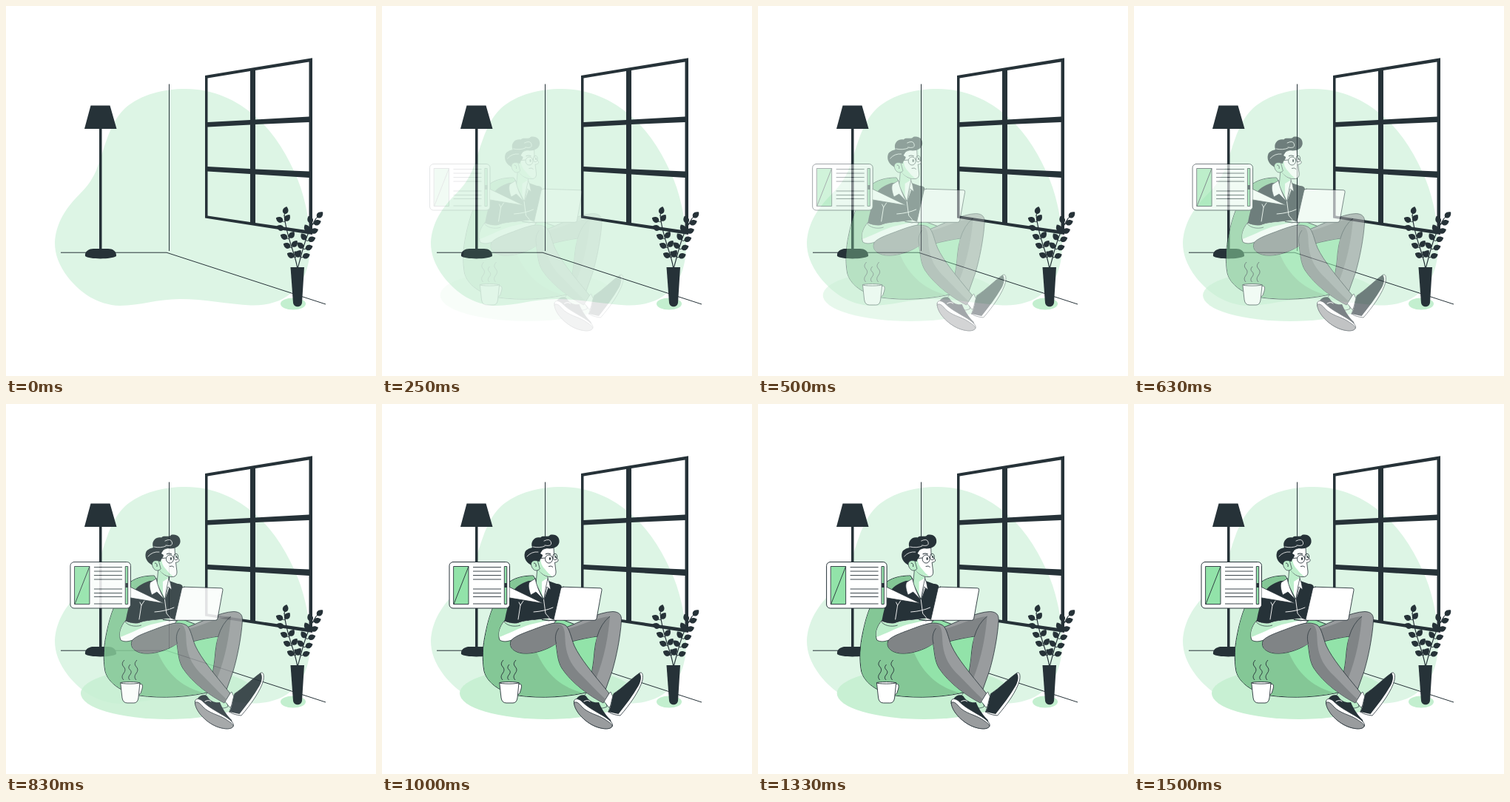
Animation of 500 by 500 pixels, one loop 1.54 s. Source, as an HTML page:

```html
<!DOCTYPE html>
<html lang="en">
<head>
<meta charset="utf-8">
<title>Reading nook</title>
<style>
html, body { margin: 0; width: 100%; height: 100%; overflow: hidden; background: #fff; }
svg { display: block; width: 100%; height: 100%; }
.k { fill: #263238; }
.g { fill: #92e3a9; }
.m { fill: #bdeecb; }
.w { fill: #fff; }
.p { fill: #999c9e; }
.s { fill: #808486; }
.l { fill: none; stroke: #263238; }
.o { stroke: #263238; stroke-linejoin: round; stroke-linecap: round; }
.h { fill: none; stroke: #fff; stroke-linecap: round; }
</style>
</head>
<body>
<svg viewBox="0 0 500 500">
  <!-- room -->
  <path fill="#ddf5e5" d="M243 112C280 112 312 127 338 150C364 173 382 205 394 234C406 264 411 297 411 323C411 352 402 376 384 389C372 399 354 405 331 404.500C301 403 268 396 235 396C204 396 181 405 154 405C123 404 100 387 84 367C71 350 66 335 66 320C67 296 79 276 94 260C107 247 115 238 122 222C133 195 138 160 161 138C183 119 213 112 243 112Z"/>
  <path class="l" d="M220.500 105.500V331M74 333.200H217L432 403"/>
  <path class="k" fill-rule="evenodd" d="M269 94L414 70.300V309L269 286.500Z
    M272.500 97.500L330 88V154L272.500 157Z M337 87L409.500 75.500V149.500L337 153.500Z
    M272.500 163.500L330 160.500V220L272.500 217Z M337 160L409.500 157V223.500L337 220.500Z
    M272.500 223.500L330 227V292L272.500 283.500Z M337 227.500L409.500 232V303.500L337 293Z"/>
  <path class="k" d="M114.500 134.500H140.500L149.500 166H106ZM126 165H129.500V330H126Z
    M107 338C106 331 113 328 118 328H138C144 328 149.500 331 149 338C143 342.500 112 342.500 107 338Z"/>
  <ellipse cx="388" cy="402.500" rx="17" ry="8" fill="#c3efcf"/>
  <path class="l" d="M393.500 353C391 335 378 310 376 282M394.500 353C400 335 404 310 419 287" stroke-width="1.200"/>
  <g id="leaves" class="k"></g>
  <path class="k" d="M384.500 353H403L400 401C399 408 389 408 388 401Z"/>

  <g id="scene" opacity="0">
    <ellipse cx="223" cy="391" rx="118" ry="35" fill="#c8f0d3"/>

    <!-- bean bag -->
    <path class="g o" d="M204 232C190 232 177 235 168 244C153 262 145 284 140 309C136 327 135 345 138 361C142 376 158 389 184 394C214 398 252 397 288 387C300 364 303 337 298 312L240 290Z"/>
    <path fill="#84c796" d="M204 232.500C190 232.500 178 235 169 244C153 263 145 284 140.500 309C136.500 327 136 345 138.500 361C142 376 158 388 184 393.500C212 397 242 396 272 390.500C246 384 222 368 208 333L215 280Z"/>

    <!-- far leg and shoe -->
    <path class="m o" d="M278 388L271 397C281 407 293 415 304 409L300 390Z" stroke-width=".7"/>
    <path class="p o" d="M246 303C267 295 293 281 312 280.500C321 281 324 285 323.500 293C322 315 317 341 311 361L300 392L276 390C283 370 286 350 287 335Q288 324 291 314Q276 316 256 321Z" stroke-width=".8"/>
    <path class="s" d="M250 304C270 299 291 288 308 287C306 312 301 342 289 372L282 375C286 355 287 335 290.500 313.500C279 316 268 317 256 320Z"/>
    <path class="l" d="M308 287Q296 296 290.500 315" stroke-width=".7"/>
    <path class="k" d="M263 398C266 393 273 392 276 395C280 402 287 404 293 403C296 410 300 418 309 427C312 436 307 437 301 433L268 411Z"/>
    <path class="w o" d="M259.500 402C260 397 265 398 269 401C278 410 285 413 293 418C302 423 313 430 311.500 435C310 439 302 440 292 437C275 432 259 414 259.500 402Z" stroke-width=".8"/>
    <path class="p o" d="M259.500 404C262 401 266 404 270 409C278 418 292 420 301 426C307 430 312 433 311 436C308 440 300 439.500 292 437C276 432 260 416 259.500 404Z" stroke-width=".8"/>
    <path class="h" d="M273 402Q278 399 281 402" stroke-width="1"/>

    <!-- torso -->
    <path class="k" d="M198 239C187 243 180 247 176 255C171 267 168 281 165.500 294L187 299L232 298L243 248C243 244 239 243 236 243L222 238Z"/>
    <path class="h" d="M191 266L187 272L184 291M187 272L185 268M218.500 264L221 283L227 290M205 281Q220 280 231 275" stroke-width=".9"/>
    <path class="m o" d="M210 221L208 243L218 263L224 247V231Z" stroke-width=".7"/>
    <path class="w" d="M224 235L216 240L216 256L219 264L225 247Z"/>
    <path class="w o" d="M207 236L199 241C197 246 199 252 201 258L208 254L218 264C213 255 209 246 207 236ZM224 236L226 241L228 251L223 247L219 264C220 253 222 245 224 236Z" stroke-width=".7"/>

    <!-- near leg and shoe -->
    <path class="w o" d="M298 399L309 389C311 394 313 398 317 399L307 410Z" stroke-width=".7"/>
    <path class="p o" d="M174 321C177 312 192 308 207 303C222 297 238 293 248 299C254 304 255 315 260 327C268 344 284 363 307 391L299 404C281 395 256 377 243 357C237 347 237 336 235 324C222 333 204 338 191 337C179 336 171 329 174 321Z" stroke-width=".8"/>
    <path class="s" d="M174.500 321C178 313 194 309 209 303.500C221 299 234 295.500 241 298C248 301 247 312 248 325C250 343 258 356 270 367C280 377 291 389 302 399L299 403.500C281 395 256 377 243.500 357C238 347 237 336 235.500 324C222 332 204 337.500 191 336.500C179 335 172 329 174.500 321Z"/>
    <path class="l" d="M235.500 324C233 315 235 308 239 303" stroke-width=".7"/>
    <path class="w o" d="M306 416C309 409 310 400 313 391.500C325 384 337 371 348 363.500C352 361.500 353 366 352 373C348 388 335 406 322 421C316 420.500 310 419 306 416Z" stroke-width=".8"/>
    <path class="k" d="M306 416C310 409 310 400 313 391.500C325 384 337 371 348 363.500C351 367 350.500 374 346.500 381C339 394 329 407 319.500 419Z"/>

    <!-- arm and laptop -->
    <path class="w o" d="M165.500 293C159 300 156 311 159 319C164 322 170 321 175 319C180 313 196 308 209 303C217 300 226 297 233 296L235 292L226 289L211 291C200 292 190 293 183 296C176 297 170 295 165.500 293Z" stroke-width=".8"/>
    <path class="m" d="M165.500 294C160 300 157 308 158.500 315C170 311 184 303 200 298L222 293L226 290L211 291.500C200 292.500 190 293.500 183 296.500C176 297.500 170 295.500 165.500 294Z"/>
    <path class="l" d="M165 294C168 299 178 302 187 299M216 291L225 293L231 292" stroke-width=".7"/>
    <path class="w o" d="M245 247.200L295 248.800Q297.500 249 297 251.500L290 290Q289.500 292.300 287 292.300H233Q231.500 292 232.200 290L241.500 249.500Q242 247.200 245 247.200Z" stroke-width=".9"/>
    <path class="l" d="M216 291.500L236 293" stroke-width="1.200"/>

    <!-- head -->
    <path class="w o" d="M206 208C207 200 216 195 232 193L232.500 204L238 210.500C238.500 213 236 214 233.500 214L235 226C235.500 232 232 234 227 233.500C221 233 216 230 212 225Z" stroke-width=".8"/>
    <path class="m" d="M206 208L214 207C214 214 216 219 220 223C223 227 226 230 230 233C221 233.500 215 229 210 223Z"/>
    <path class="k" d="M204 219C195 215 191 208 193 201C194 197 199 195 203 194C200 186 206 179 214 180.500C217 176.500 225 181 227 177C235 175 240.500 180 239.500 187C238 194 230 196.500 222 195C217 195 216 199 214 202L217 204C217 208 213 209 213 213L209 212Z"/>
    <path class="m o" d="M210 212C204 210 200 214 202 219C204 225 209 227 213 223Z" stroke-width=".7"/>
    <path class="h" d="M219 185Q227 181 228.500 187T220 191M204 193Q213 195 220 192M196 206Q202 199 211 200" stroke-width=".8"/>
    <g class="l" stroke-width=".9">
      <ellipse cx="225.500" cy="209.500" rx="5" ry="5.500"/>
      <ellipse cx="233.800" cy="206.500" rx="2.800" ry="4.200"/>
      <path d="M220.500 208L210 209M230 207.500L231.500 206.500M225 219.500Q229 218 231 220.500M205 215Q209 215 208 220"/>
      <path d="M221 203Q224 201 228 203" stroke-width="1.200"/>
    </g>
    <ellipse class="k" cx="227" cy="209" rx="1.100" ry="1.900"/>
    <ellipse class="k" cx="234.300" cy="206.500" rx=".8" ry="1.600"/>

    <!-- reading card -->
    <rect class="w o" x="91" y="213.500" width="81.500" height="62.500" rx="5"/>
    <path class="w o" d="M172.500 247.500L218 269.500L172.500 262" stroke-width=".8"/>
    <path class="g o" d="M97 219.500H117V270.500H97ZM165.700 219.500H168.700V270.500H165.700Z" stroke-width=".9"/>
    <path class="l" d="M97 270.500L117 219.500M123 220.500H161M123 226H161M123 231.500H161M123 237H161M123 250H161M123 255.500H161M123 260.500H161M123 270H161" stroke-width=".9"/>
    <path class="k" d="M165.500 242H169V248H165.500Z"/>

    <!-- mug -->
    <path class="w o" d="M184 379C190 376 189 383 187 388Q186 393 182.500 393" stroke-width=".9"/>
    <path class="w o" d="M158.800 377L161 397Q162 404 168 404H177Q182 404 183 397L185 377Z" stroke-width=".9"/>
    <ellipse class="w o" cx="171.900" cy="376.800" rx="13" ry="1.300" stroke-width=".9"/>
    <path class="l" d="M164 346q-5 5 -1 9t0 9t0 9M172 352q-4 4 -.5 7t0 7t0 7M181 346q-5 5 -1 9t0 9t0 9" stroke-width=".9"/>
  </g>
</svg>
<script>
const scene = document.getElementById('scene');
const leaves = document.getElementById('leaves');

function leaf(x, y, turn) {
  const p = document.createElementNS('http://www.w3.org/2000/svg', 'path');
  p.setAttribute('d', 'M-.4 0L-.4 -2C-5 -4 -5 -9 0 -12.500C5 -9 5 -4 .4 -2L.4 0Z');
  p.setAttribute('transform', `translate(${x} ${y}) rotate(${turn})`);
  leaves.append(p);
}

leaf(376, 283, 15);
leaf(419, 287, 47);
[[376, 292], [377, 303], [382, 315], [386, 327], [391, 340]].forEach(([x, y], i) => {
  leaf(x, y, -63);
  if (i !== 1) leaf(x, y, 36);
});
for (let i = 0; i < 5; i++) {
  const x = 414 - 3.75 * i, y = 295 + 11.25 * i;
  leaf(x, y, -25 - 6 * i);
  leaf(x, y, 70);
}

const LOOP = 1540, FPS = 24, STEPS = 36, SLIDE = 30;

const bez = (a, b, s) => 3 * (1 - s) * (1 - s) * s * a + 3 * (1 - s) * s * s * b + s * s * s;

// cubic-bezier(.36, -.01, .5, 1.38), solved by bisection
function ease(x) {
  let lo = 0, hi = 1;
  for (let i = 0; i < 30; i++) {
    const mid = (lo + hi) / 2;
    if (bez(0.36, 0.5, mid) < x) lo = mid; else hi = mid;
  }
  return bez(-0.01, 1.38, hi);
}

function draw(ms) {
  const step = Math.floor((ms % LOOP) * FPS / 1000 + 0.09);
  const y = step < 3 ? 0 : ease(Math.min(1, (step + 0.5) / STEPS));
  scene.setAttribute('opacity', Math.max(0, Math.min(1, y)));
  scene.setAttribute('transform', `translate(${SLIDE * (y - 1)} 0)`);
}

const start = performance.now();
function tick() {
  draw(performance.now() - start);
  requestAnimationFrame(tick);
}
tick();
</script>
</body>
</html>
```
